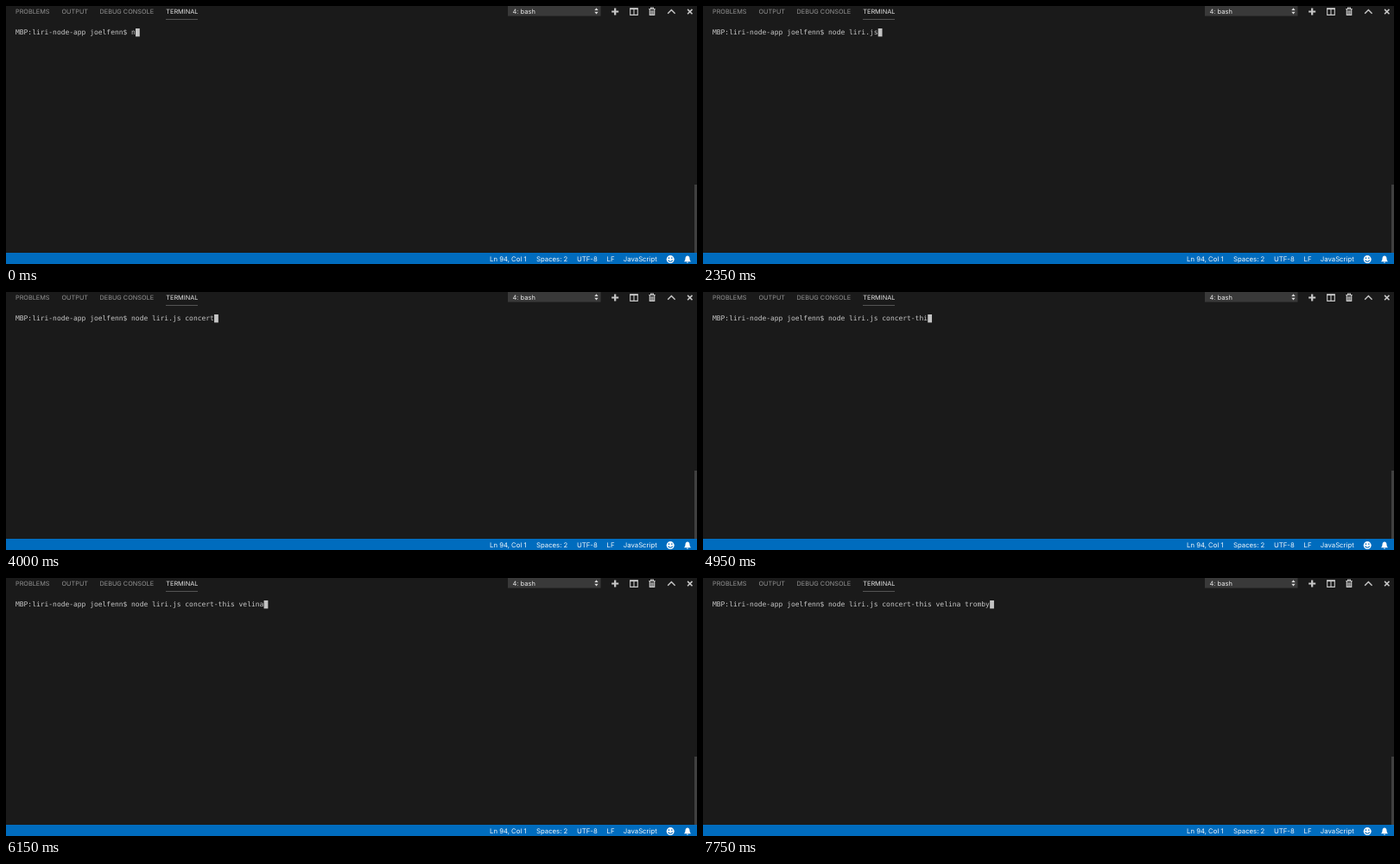
An HTML page for the animation above (8000 ms loop, 800x299 px).

```html
<!DOCTYPE html>
<html lang="en">
<head>
<meta charset="utf-8">
<title>Terminal</title>
<style>
  html, body { margin: 0; width: 100%; height: 100%; overflow: hidden; background: #1a1a1a; }
  svg { display: block; }
  text { font-family: Inter, sans-serif; text-rendering: geometricPrecision; white-space: pre; }
  .tabs { font-size: 7.3px; fill: #929292; }
  .status { font-size: 7.75px; fill: #f2f7fb; }
  #line { font: 7.96px "DejaVu Sans Mono", monospace; fill: #c6c6c6; }
  .icons { fill: none; stroke: #c8c8c8; }
</style>
</head>
<body>
<svg width="800" height="299" viewBox="0 0 800 299">
  <rect width="800" height="299" fill="#1a1a1a"/>

  <g class="tabs">
    <text x="11" y="8.7">PROBLEMS</text>
    <text x="64.5" y="8.7">OUTPUT</text>
    <text x="108.5" y="8.7">DEBUG CONSOLE</text>
    <text x="185.3" y="8.7" fill="#e4e4e4">TERMINAL</text>
  </g>
  <path d="M185 15.5H222" stroke="#646464" stroke-width=".8"/>

  <rect x="581" width="107.5" height="11.6" fill="#393939"/>
  <text x="586.5" y="8.8" font-size="7.5" fill="#e8e8e8">4: bash</text>
  <path d="M681.3 5l2.2-2.8 2.2 2.800zM681.3 6.800l2.2 2.800 2.2-2.800z" fill="#d8d8d8"/>

  <g class="icons">
    <path d="M701.200 6.500h8M705.200 2.500v8" stroke-width="2.2"/>
    <path d="M722.700 3h8.600v7.400h-8.600zM727 3v7.400" stroke-width="1.100"/>
    <path d="M722.200 3.200h9.600" stroke-width="1.800"/>
    <path d="M744.300 3.500h7.400M746.600 3v-1h2.800v1M745.300 4v6.400h5.400V4M747.100 5v5M748.900 5v5" stroke-width="1.200"/>
    <path d="M766.200 8.800l4.200-4.200 4.200 4.200" stroke-width="1.400"/>
    <path d="M789.100 3.900l5.400 5.400M794.500 3.900l-5.400 5.400" stroke-width="1.600"/>
  </g>

  <text id="line" x="11" y="33.4"></text>
  <rect id="cursor" y="26" width="4.8" height="9.4" fill="#c4c4c4"/>
  <rect x="797" y="207" width="3" height="79" fill="#404040"/>

  <rect y="286" width="800" height="13" fill="#006cbe"/>
  <g class="status">
    <text x="560" y="296.2">Ln 94, Col 1</text>
    <text x="614" y="296.2">Spaces: 2</text>
    <text x="661" y="296.2">UTF-8</text>
    <text x="695.6" y="296.2">LF</text>
    <text x="714.8" y="296.2">JavaScript</text>
  </g>
  <circle cx="769.2" cy="293.6" r="4.5" fill="#fff"/>
  <path d="M767.5 291.3v1.6M770.9 291.3v1.6M766.5 294.6q2.7 3.2 5.4 0" fill="none" stroke="#006cbe" stroke-width="1.1"/>
  <path d="M785 296.2q1.500-1.200 1.500-3.400 0-2.900 2.500-3.200 2.500.3 2.500 3.200 0 2.200 1.500 3.400zM787.800 296.800h2.400q-1.200 1.800-2.400 0z" fill="#fff"/>
</svg>

<script>
const LOOP = 8000, KEY_GAP = 115, CELL = 4.793, LEFT = 11;
const prompt = "MBP:liri-node-app joelfenn$ ";

// Bursts of typing by start time in ms; letters in a burst follow at an even pace
const bursts = {
  0: "n", 50: "ode", 600: " ",
  1000: "l", 1200: "iri", 1600: ".", 1950: "js", 2400: " ",
  2550: "co", 3100: "ncert", 4550: "-this ",
  5550: "velina ", 6500: "t", 6950: "romby"
};

const line = document.getElementById("line");
const cursor = document.getElementById("cursor");

function typedAt(t) {
  return Object.entries(bursts)
    .filter(([start]) => start <= t)
    .map(([start, letters]) => letters.slice(0, 1 + Math.floor((t - start) / KEY_GAP)))
    .join("");
}

function draw(now) {
  const text = prompt + typedAt(now % LOOP);
  line.textContent = text;
  cursor.setAttribute("x", LEFT + text.length * CELL);
  requestAnimationFrame(draw);
}
draw(performance.now());
</script>
</body>
</html>
```
